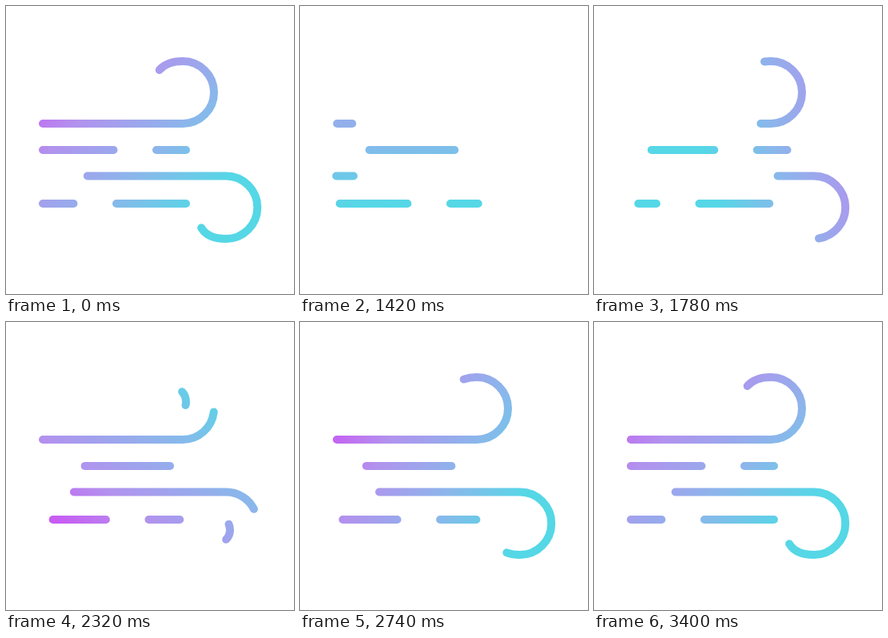
These frames come from a looping animation (360 px wide and 360 px high, 3430 ms). An HTML page without scripts:

```html
<!DOCTYPE html>
<html lang="en">
<head>
<meta charset="utf-8">
<title>Wind</title>
<style>
  @property --tail { syntax: "<number>"; inherits: false; initial-value: 0; }
  @property --head { syntax: "<number>"; inherits: false; initial-value: 0; }

  html, body { margin: 0; width: 100%; height: 100%; overflow: hidden; background: #fff; }
  svg { display: block; width: 100vw; height: 100vh; }

  path {
    --smooth: cubic-bezier(.333, 0, .667, 1);
    fill: none;
    stroke: url(#tint);
    stroke-width: 10;
    stroke-linecap: round;
    animation: 3430ms linear infinite;
  }

  /* Curls: positions are percentages of the whole path */
  .gust, .pass {
    stroke-dasharray: calc((var(--head) - var(--tail)) * 1px) 300px;
    stroke-dashoffset: calc(var(--tail) * -1px);
  }
  .gust { animation-name: gust; }
  .pass { animation-name: pass-head, pass-tail, pass-show; }
  .upper { --start: 0; --end: 78.5; }
  .lower { --start: 11.9; --end: 81.4; }

  @keyframes gust {
    0% { --tail: var(--start); --head: var(--end); visibility: visible; }
    29.155% { --tail: var(--start); --head: var(--end); animation-timing-function: cubic-bezier(.333, 0, .667, 1); }
    38.86% { --tail: 100; --head: 100; visibility: visible; }
    38.87% { --tail: 100; --head: 100; visibility: hidden; }
    58.3% { --tail: 100; --head: 100; visibility: hidden; animation-timing-function: step-end; }
    58.31% { --tail: 0; --head: 0; visibility: visible; animation-timing-function: cubic-bezier(.21, .89, .33, 1); }
    99.125%, 100% { --tail: var(--start); --head: var(--end); visibility: visible; }
  }
  @keyframes pass-head {
    0%, 37.41% { --head: 0; animation-timing-function: cubic-bezier(.4, 0, .2, 1); }
    68.63%, 100% { --head: 100; }
  }
  @keyframes pass-tail {
    0%, 40.82% { --tail: 0; animation-timing-function: cubic-bezier(.4, 0, .2, 1); }
    76.97%, 100% { --tail: 100; }
  }
  @keyframes pass-show {
    0%, 100% { visibility: hidden; animation-timing-function: step-end; }
    37.6% { visibility: visible; animation-timing-function: step-end; }
    74.6% { visibility: hidden; animation-timing-function: step-end; }
  }

  /* Dashed rows: dashes flow right while the ends drift */
  .row { stroke-dasharray: 106.5px 53.5px; }
  .row.top { --shift: 69.5px; animation-name: flow, drift-top; }
  .row.bottom { --shift: 19.5px; animation-name: flow, drift-bottom; }

  @keyframes flow {
    0%, 29.155% { stroke-dashoffset: var(--shift); animation-timing-function: cubic-bezier(.333, 0, .667, 1); }
    99.125%, 100% { stroke-dashoffset: calc(var(--shift) + 640px); }
  }
  @keyframes drift-top {
    0%, 29.155%, 99.125%, 100% { d: path("M225 180H46"); animation-timing-function: cubic-bezier(.333, 0, .667, 1); }
    64.14% { d: path("M248 180H82"); animation-timing-function: cubic-bezier(.333, 0, .667, 1); }
  }
  @keyframes drift-bottom {
    0%, 29.155%, 99.125%, 100% { d: path("M225 247H46"); animation-timing-function: cubic-bezier(.333, 0, .667, 1); }
    64.14% { d: path("M217 247H59"); animation-timing-function: cubic-bezier(.333, 0, .667, 1); }
  }
</style>
</head>
<body>
<svg viewBox="0 0 360 360">
  <defs>
    <linearGradient id="tint" gradientUnits="userSpaceOnUse" x1="99" y1="36" x2="279" y2="216">
      <stop offset="0" stop-color="#c85cf3"/>
      <stop offset=".275" stop-color="#b292ee"/>
      <stop offset=".667" stop-color="#8ab7eb"/>
      <stop offset="1" stop-color="#55d7e6"/>
      <animateTransform attributeName="gradientTransform" type="rotate" dur="3430ms" repeatCount="indefinite"
        values="0 219 156;0 219 156;360 219 156;360 219 156" keyTimes="0;.29155;.8746;1"
        calcMode="spline" keySplines="0 0 1 1;.333 0 .667 1;0 0 1 1"/>
    </linearGradient>
  </defs>

  <path class="gust upper" pathLength="100" d="M46 147H221A39 39 0 0 0 221 69C200 69 186 80 186 95C186 107 195 116 207 116C217 116 225 109 225 100C225 94 223 90 220 87"/>
  <path class="pass" pathLength="100" d="M46 147H221A39 39 0 0 0 221 69C200 69 186 80 186 95C186 107 195 116 207 116C217 116 225 109 225 100C225 94 223 90 220 87"/>

  <path class="gust lower" pathLength="100" d="M45 212.5H275A39 39 0 0 1 275 291C254 291 241 281 241 265C241 252 250 242 262 242C272 242 280 250 280 260C280 265 278 269 275 272"/>
  <path class="pass" pathLength="100" d="M45 212.5H275A39 39 0 0 1 275 291C254 291 241 281 241 265C241 252 250 242 262 242C272 242 280 250 280 260C280 265 278 269 275 272"/>

  <path class="row top" d="M225 180H46"/>
  <path class="row bottom" d="M225 247H46"/>
</svg>
</body>
</html>
```
